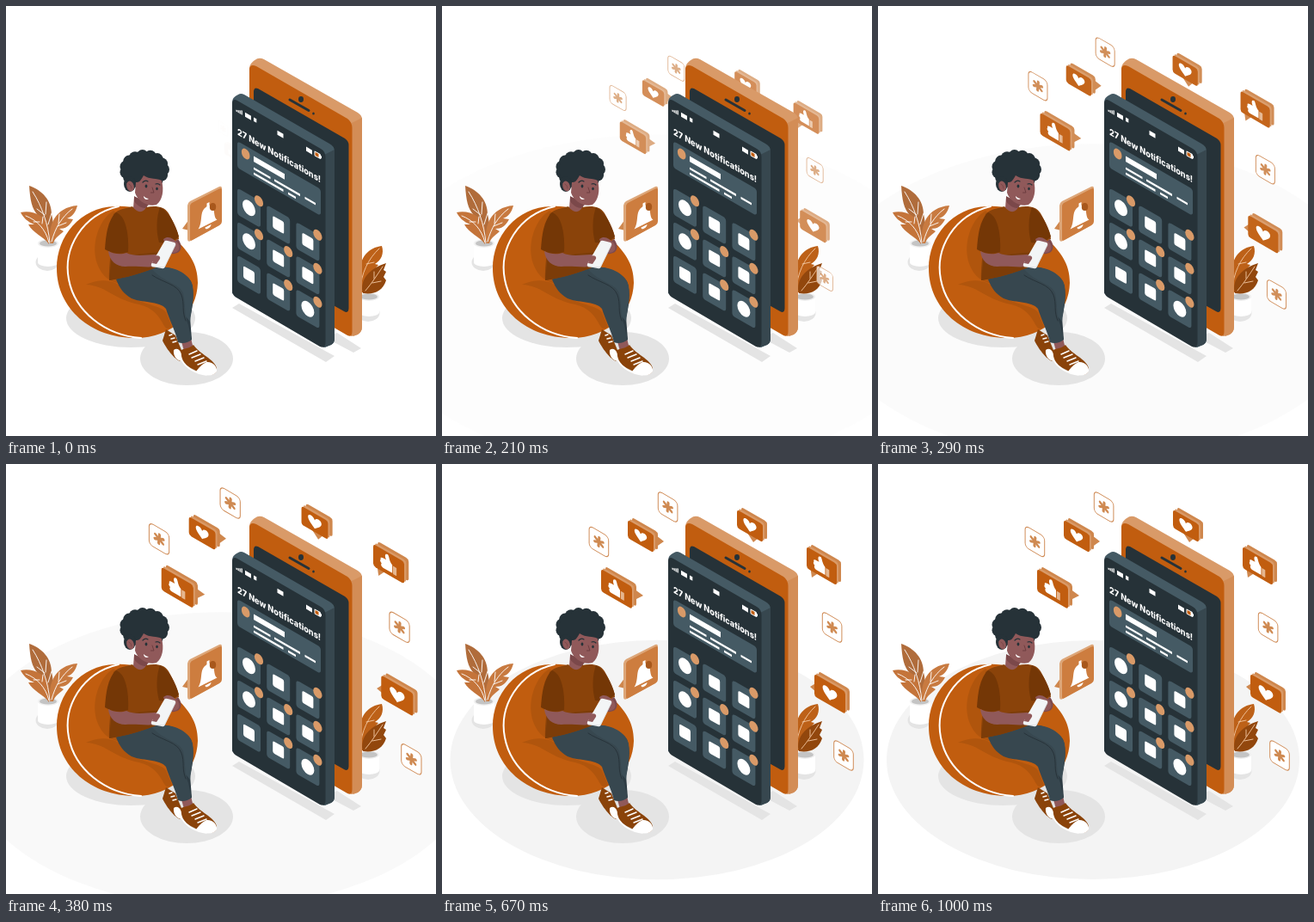
An HTML page with a canvas that plays this animation: 500x500 px, repeating every 1040 ms.

```html
<!DOCTYPE html>
<html lang="en">
<head>
<meta charset="utf-8">
<title>New notifications</title>
<style>
html, body { margin: 0; width: 100%; height: 100%; overflow: hidden; background: #fff; }
canvas { display: block; width: 500px; height: 500px; }
</style>
</head>
<body>
<canvas id="stage"></canvas>
<script>
const SIZE = 500, LOOP = 1040, STEP = 40;
const ratio = Math.max(1, window.devicePixelRatio || 1);
const ORANGE = '#c15d0f', LIGHT = '#d99a68', TAN = '#cf874d', BROWN = '#8a430a';
const DARK = '#263238', SLATE = '#37474f', GREY = '#455a64', SKIN = '#90595a', SHADE = '#e4e4e4';
const SLOPE = 0.577;

function setup(canvas) {
  canvas.width = canvas.height = SIZE * ratio;
  const ctx = canvas.getContext('2d');
  ctx.scale(ratio, ratio);
  return ctx;
}
const stage = setup(document.getElementById('stage'));
const layer = () => setup(document.createElement('canvas'));
const back = layer(), bubbles = layer(), front = layer();
let g = back;

function fill(color, d) { g.fillStyle = color; g.fill(new Path2D(d)); }
function line(color, width, d) {
  g.strokeStyle = color;
  g.lineWidth = width;
  g.lineCap = g.lineJoin = 'round';
  g.stroke(new Path2D(d));
}
function oval(color, x, y, rx, ry = rx, turn = 0) {
  g.fillStyle = color;
  g.beginPath();
  g.ellipse(x, y, rx, ry, turn, 0, Math.PI * 2);
  g.fill();
}
function box(color, x, y, w, h, r = 0) {
  g.fillStyle = color;
  g.beginPath();
  g.roundRect(x, y, w, h, r);
  g.fill();
}
// Runs draw with the origin at x, y on a wall that falls (or rises) to the right.
function wall(x, y, draw, slope = SLOPE) {
  g.save();
  g.transform(1, slope, 0, 1, x, y);
  draw();
  g.restore();
}

function bezier(p) {
  if (p <= 0) return 0;
  if (p >= 1) return 1;
  const at = (a, b, s) => 3 * (1 - s) ** 2 * s * a + 3 * (1 - s) * s * s * b + s ** 3;
  let lo = 0, hi = 1;
  for (let i = 0; i < 30; i++) {
    const mid = (lo + hi) / 2;
    if (at(0.36, 0.5, mid) < p) lo = mid; else hi = mid;
  }
  return at(-0.01, 1.38, lo);
}

function pot(x, y, w, h) {
  const r = w / 2;
  box('#fff', x - r, y, w, h);
  oval('#fff', x, y + h, r, 5);
  oval('#f0f0f0', x, y, r, 5);
  oval('#c4c4c4', x, y, r - 2, 3.6);
}

function drawBack() {
  oval(SHADE, 145, 363, 75, 34);
  oval(SHADE, 210, 410, 54, 31);
  oval(SHADE, 48, 298, 13.5, 10);
  oval(SHADE, 421, 357, 13.5, 10);
  fill(SHADE, 'M263 351L271 346L382 407L372 414Z');
  fill(SHADE, 'M372 386L385 380L413 398L404 403Z');

  pot(49, 276, 24, 22);
  fill('#b06c3b', 'M51 276C45 264 34 254 32 242L37 243C30 236 28 225 27 209C42 214 53 226 53 242C56 254 55 267 53 276Z');
  fill('#c4743a', 'M50 277C44 268 31 264 26 254L33 254C25 251 20 246 17 240C31 237 47 244 50 258Z');
  fill('#c87a40', 'M52 276C48 256 57 234 83 232C81 240 77 245 71 247L78 248C74 256 69 259 62 259L67 262C62 267 57 269 55 276Z');
  line('#fff', 0.9, 'M51 275C49 254 42 233 31 216M46 242L47 228M49 254L53 241M45 243L36 236');
  line('#fff', 0.9, 'M50 275C46 259 36 249 23 244M53 274C57 258 65 245 77 236M61 253L62 242M60 256L70 252M39 251L32 251M42 253L43 245');

  pot(422, 338, 24, 18);
  fill('#bd6118', 'M411 310C412 292 421 281 437 279C440 288 436 296 429 300L433 301C426 309 421 318 417 333L409 333Z');
  fill('#92470d', 'M415 334C411 318 423 305 442 299L439 307L442 309L439 315L442 319C438 332 427 336 415 334Z');
  line('#f3c9a4', 0.9, 'M412 330C413 311 421 294 434 282M419 300L428 298M418 331C425 323 432 312 438 303M428 317L428 309M426 322L436 320');
}

function heart() {
  fill('#fff', 'M0 7C-3 4-8 1-8-3C-8-7-2-8 0-3C2-8 8-7 8-3C8 1 3 4 0 7Z');
}
function thumb() {
  fill('#fff', 'M4 8L-6 8C-9 8-9 5-8 4C-10 3-10 1-9 0C-10-2-8-3-6-3L-3-3C-5-7-4-10-1-10C1-8 0-4 4-1Z');
  box('#e5b68f', 4.8, -0.5, 4, 9, 0.5);
}
function bubble(x, y, w, h, icon, size, tail) {
  fill(TAN, tail);
  wall(x + 5, y - 3, () => box(TAN, 0, 0, w, h, 3));
  wall(x + 2, y - 1.5, () => box(LIGHT, 0, 0, w, h, 3));
  wall(x, y, () => {
    box(ORANGE, 0, 0, w, h, 3);
    g.translate(w / 2, h / 2);
    g.scale(size, size);
    icon();
  });
}
function card(x, y) {
  wall(x, y, () => {
    box('#fff', -11.3, -12.5, 22.6, 25, 4.5);
    g.strokeStyle = '#d08d59';
    g.lineWidth = 1;
    g.stroke();
    g.rotate(0.1);
    for (let i = 0; i < 3; i++) {
      line('#cf8a52', 3, 'M0-5.3L0 5.3');
      g.rotate(Math.PI / 3);
    }
  });
}
function drawBubbles() {
  card(182.4, 90.5);
  card(262.6, 50);
  card(453.6, 190);
  card(467, 339);
  bubble(216, 65, 30, 21, heart, 0.9, 'M249 83L258 90L248 97Z');
  bubble(343, 53, 30, 21, heart, 0.95, 'M355 80L362 91L368 86Z');
  bubble(433, 244, 36, 26, heart, 1.05, 'M436 254L428 259L436 266Z');
  bubble(185, 122, 36, 26, thumb, 1, 'M223 145L234 153L222 159Z');
  bubble(424, 96, 35, 25, thumb, 1, 'M428 118L430 132L439 126Z');
}

function drawBell() {
  fill(TAN, 'M213 248L205 259L213 261Z');
  fill('#dda678', 'M211 232Q211 229 214 227L248 210Q251 209 251 212L251 250Q251 253 248 255L215 273Q211 275 211 271Z');
  fill('#cd7d3f', 'M214 233Q214 230 217 228.500L248 212.500Q251 211 251 214L251 250Q251 253 248 255L217 272Q214 274 214 271Z');
  wall(234.5, 244, () => {
    fill('#fff', 'M-11 10C-7 6-8-2-6.500-7C-4-13 4-13 6.500-7C8-2 7 6 11 10Z');
    fill('#fff', 'M-3 12L4 12C4 16-3 16-3 12ZM-1-15L2-15L2-11L-1-11Z');
  }, -0.5);
  oval('#a8581c', 240.5, 233.5, 3.7, 4.5);
}

function backPhone() {
  fill(LIGHT, 'M283 73Q283 66 292 61.200Q296 60 300 62L409 124Q414 127 414 132L414 373Q414 379 409 382L404 384L283 314Z');
  fill('#d38d56', 'M402 136L414 130L414 373Q414 379 409 382L401 384Z');
  fill(ORANGE, 'M283 73Q284 67 291 70L397 131Q402.500 135 402.500 142L402.500 378Q402.500 386 397 383L283 317Z');
  fill(DARK, 'M288 100Q288 94 293 96L394 154Q398.500 157 398.500 162L398.500 351Q398.500 358 393 355L288 296Z');
  line(DARK, 3, 'M330 109L352 121.500');
  oval(DARK, 343, 108.500, 3, 3.4);
  oval(DARK, 357.500, 125, 1.3, 1.6);
}

function tiles() {
  const round = [1, 0, 0, 1, 0, 0, 0, 0, 1];
  const badge = [1, 0, 1, 1, 1, 1, 0, 1, 1];
  for (let i = 0; i < 9; i++) {
    const x = 6 + (i % 3) * 34.2, y = 208 + Math.floor(i / 3) * 39;
    box(GREY, x, y, 27, 31, 3.5);
    if (round[i]) oval('#fff', x + 13.5, y + 15.5, 7.5, 8.5);
    else box('#fff', x + 7, y + 8.5, 13, 14, 2);
    if (badge[i]) oval(LIGHT, x + 25, y + 0.9, 5.1, 5.8);
  }
}

function frontPhone() {
  fill(GREY, 'M263 112Q263 106 270 103Q273 101 277 103L376 160Q382 163 382 169L382 387Q382 392 378 394L371 397L263 334Z');
  fill(SLATE, 'M370 173L382 167L382 387Q382 392 378 394L369 397Z');
  fill(DARK, 'M263 114Q263 107 269 110L366 166Q371.500 169 371.500 176L371.500 391Q371.500 399 365 396L267 338.500Q263 336 263 331Z');

  wall(263, 0, () => {
    for (let i = 0; i < 4; i++) box('#fff', 4.5 + i * 2, 118 - i, 1.3, 2 + i);
    box('#fff', 15, 115, 7, 5);
    box('#fff', 25, 115, 3.3, 4.5);
    box('#fff', 52.5, 114.5, 7, 5);
    box('#fff', 86, 114, 7, 5);
    box('#fff', 95.5, 113, 7.5, 6, 1);
    box(ORANGE, 96.5, 114, 4, 4);
    box('#fff', 103, 114.5, 1, 3);

    box(GREY, 6, 153.5, 97, 31, 3.5);
    oval(LIGHT, 15.7, 163, 4.8, 5.8);
    box('#fff', 25, 160, 36, 6.5);
    for (const [x, y, w] of [[25, 173, 19.5], [49, 173, 30], [84.5, 173, 12.5], [25, 179, 34.5], [65, 179, 9]])
      box('#fff', x, y, w, 2.6);
    tiles();
  });

  g.save();
  g.transform(0.866, 0.5, 0, 1, 269, 149.5);
  g.fillStyle = '#fff';
  g.font = '800 10.5px Inter, Roboto, sans-serif';
  g.fillText('27 New Notifications!', 0, 0);
  g.restore();
}

function chair() {
  fill(ORANGE, 'M127 233C86 234 59 268 59 305C59 352 99 386 150 386C195 386 222 356 223 322C223 299 212 286 198 272C183 248 160 231 127 233Z');
  fill('#b0550d', 'M125 238C106 250 98 281 107 302C112 314 120 320 132 323L133 245Z');
  fill('#b0550d', 'M93 324C109 316 130 318 136 330C151 348 178 346 186 356L193 373C180 384 187 352 150 346C125 340 115 325 93 324Z');
  line('#fff', 2, 'M131 233C88 243 66 282 73 318C80 355 115 383 157 386');
}

function shoes() {
  fill(BROWN, 'M186 376L197 383L206 405L203 413C196 412 185 396 182 389Z');
  fill('#fff', 'M195 400C201 395 206 405 205 413C199 413 194 407 195 400Z');
  line('#fff', 1.4, 'M190 383L193 382M192 387L196 386M194 391L198 390');
  fill(SKIN, 'M203 387L215 386L218 399L207 401Z');
  fill(BROWN, 'M204 400C208 398 214 398 218 394C224 404 243 411 245 421C246 430 235 431 225 426C214 421 202 416 204 400Z');
  fill('#fff', 'M233 414C240 413 246 419 245 425C241 432 229 430 221 425C224 421 227 417 233 414Z');
  line('#fff', 1.5, 'M205 413C210 421 221 428 233 429');
  line('#fff', 1.5, 'M213 405L222 401M216 409L226 405M220 413L230 409M223 417L233 413');
}

function legs() {
  fill('#2d3b43', 'M150 310C170 298 203 302 215 320C220 333 217 350 214 362L216 388L203 389L193 346Z');
  fill(SLATE, 'M128 318C138 304 161 300 176 304C186 318 205 322 208 335C209 350 208 361 212 371L216 388C211 392 205 393 200 391C197 378 190 365 186 352C179 343 156 345 146 340C137 335 132 328 128 318Z');
  fill('#3b4d56', 'M169 305C189 300 213 309 217 325C219 339 216 351 214 367L209 361C207 346 209 334 202 328C194 321 181 319 169 305Z');
  line(DARK, 0.9, 'M170 313C183 322 199 323 204 336C208 347 204 354 209 366');
}

function torso() {
  fill(SKIN, 'M149 222L164 226L164 240C158 243 151 240 148 235Z');
  fill(BROWN, 'M147 233C152 241 160 241 163 234C174 232 184 233 189 241C196 253 201 265 201 271L181 278L179 302C158 311 139 316 120 319C119 306 123 286 121 276L125 242C131 236 140 235 147 233Z');
  fill('#743706', 'M128 240C118 249 116 268 115 283C123 288 133 289 142 286C143 268 140 244 128 240Z');
  fill('#743706', 'M179 234C190 240 197 254 201 268C195 274 187 276 178 275C174 260 175 246 179 234Z');
  fill('#7c3c08', 'M139 290L179 286L179 302C158 311 139 316 120 319C121 307 123 297 122 288Z');
  fill(SKIN, 'M119 285C126 289 135 289 140 287C150 292 164 289 173 289C181 288 184 294 181 300C174 306 156 302 139 303C128 303 120 296 119 285Z');
  fill('#7e4b4d', 'M183 275C191 277 196 274 200 271C204 276 205 282 201 286C195 290 187 288 183 283Z');
  fill(SKIN, 'M183 271C189 266 195 271 199 275C204 281 201 287 194 287L186 281Z');
  fill('#f3f5f6', 'M184 274Q185 272 188 273L196 275Q198 276 197 278L185 303Q184 306 181 305L170 303Q168 302 169 300Z');
  line('#d5d9db', 0.7, 'M197 278L184 304L170 303');
  fill(SKIN, 'M172 291C177 289 180 291 179 294L175 300L170 299Z');
}

function head() {
  for (let i = 0; i < 15; i++) {
    const a = i / 15 * Math.PI * 2;
    oval(DARK, 161 + 22 * Math.cos(a), 190 + 16 * Math.sin(a), 7);
  }
  oval(DARK, 161, 190, 25, 19);
  oval(DARK, 144, 207, 7, 9);
  fill('#7b484a', 'M149 221L166 231L162 235C156 235 152 231 149 227Z');
  fill(SKIN, 'M151 205C156 206 158 200 160 197C167 202 176 200 181 203C184 214 182 226 175 231C165 234 153 227 150 217Z');
  oval(SKIN, 144.500, 209.500, 4.2, 6, -0.3);
  line('#774447', 0.8, 'M143 207Q146 208 146 212');
  oval(DARK, 163, 209.5, 1.4, 1.9);
  oval(DARK, 175.5, 212.5, 1.3, 1.8);
  line(DARK, 1.2, 'M159 205Q162 202 165 204M174 207Q177 206 179 208');
  line('#693a3d', 0.9, 'M170 211L172 217L168.500 217');
  fill('#fff', 'M160 221C162 223 164 224 166 224C164 226 160 225 160 221Z');
}

function drawFront() {
  backPhone();
  frontPhone();
  chair();
  shoes();
  legs();
  torso();
  head();
  drawBell();
}

g = back; drawBack();
g = front; drawFront();

function put(ctx, alpha = 1) {
  stage.globalAlpha = Math.max(0, Math.min(1, alpha));
  stage.drawImage(ctx.canvas, 0, 0, SIZE, SIZE);
  stage.globalAlpha = 1;
}

function render(ms) {
  const t = Math.floor(ms / STEP) * STEP + 36;
  const floor = bezier(t / 1000), pop = bezier(t / 500);

  g = stage;
  box('#fff', 0, 0, SIZE, SIZE);
  const zoom = 1.5 - 0.5 * floor;
  g.globalAlpha = Math.max(0, Math.min(1, floor));
  oval('#f4f4f4', 250, 344, 240 * zoom, 139 * zoom);
  g.globalAlpha = 1;
  put(back);

  g = bubbles;
  g.clearRect(0, 0, SIZE, SIZE);
  g.save();
  const s = 0.5 + 0.5 * pop;
  g.translate(325, 196.5);
  g.scale(s, s);
  g.translate(-325, -196.5);
  drawBubbles();
  g.restore();
  put(bubbles, pop);

  put(front);
}

const start = performance.now();
function tick() {
  render((performance.now() - start) % LOOP);
  requestAnimationFrame(tick);
}
tick();
</script>
</body>
</html>
```
